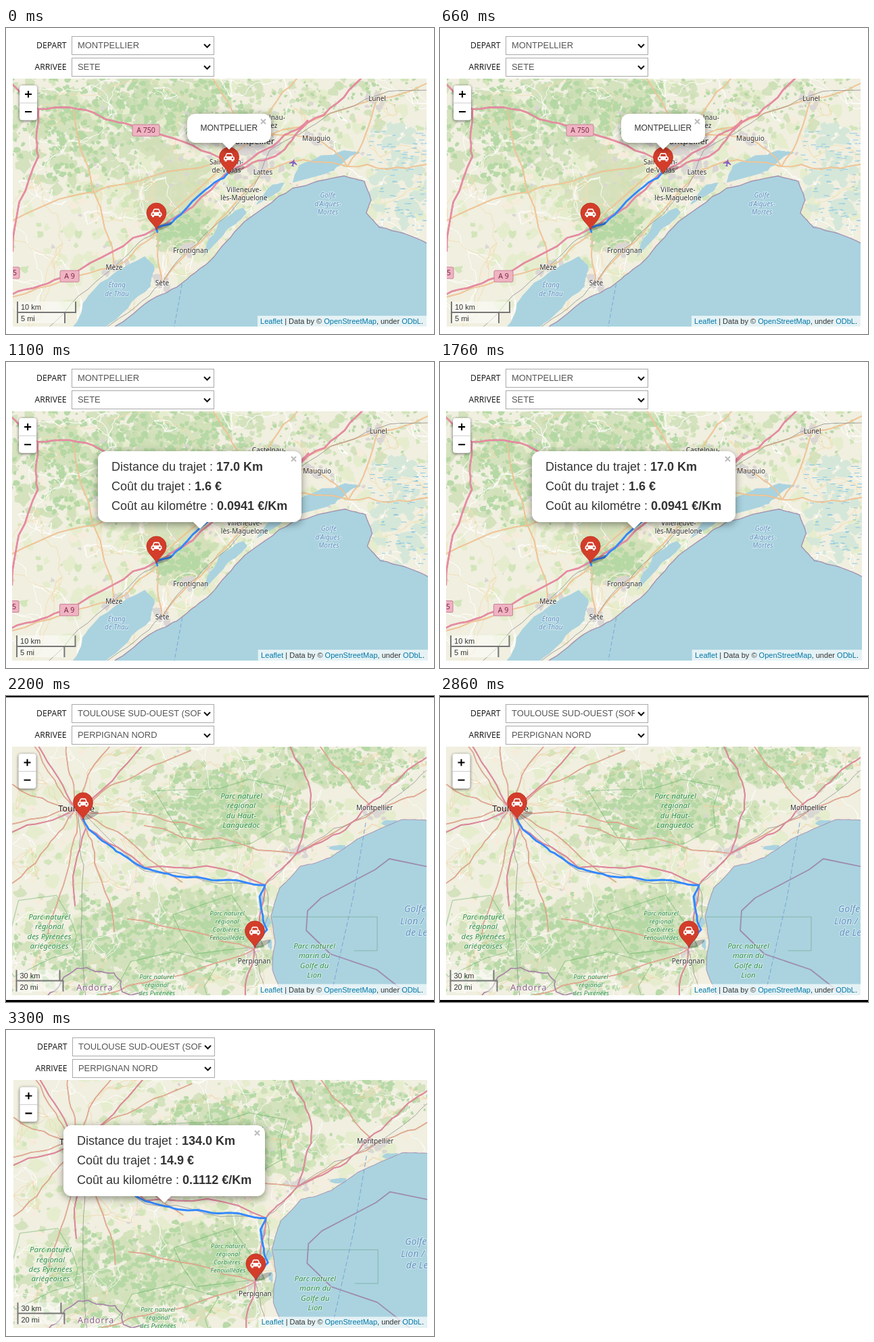
An HTML page that plays this animation: 633 px wide and 453 px high, repeating every 4.4 s.

```html
<!DOCTYPE html>
<html lang="fr">
<head>
<meta charset="utf-8">
<title>Coût du trajet</title>
<style>
html, body { margin: 0; width: 100%; height: 100%; overflow: hidden; background: #fff; }
#stage { display: block; width: 633px; height: 453px; }
.ui { font-family: "Liberation Sans", Arial, sans-serif; }
.form { font: 12.2px "Open Sans", "Noto Sans", sans-serif; fill: #111; }
.map { font: 10px "Noto Sans", "Open Sans", sans-serif; }
.halo { paint-order: stroke; stroke: #fff; stroke-opacity: .5; stroke-width: 2px; stroke-linejoin: round; }
.line { fill: none; stroke-linejoin: round; stroke-linecap: round; }
.popup { filter: drop-shadow(0 3px 6px rgba(0,0,0,.42)); }
.zoom { filter: drop-shadow(0 1px 2px rgba(0,0,0,.6)); }
</style>
</head>
<body>
<svg id="stage" viewBox="0 0 633 453"></svg>
<script>
let seed = 7;
const rnd = () => (seed = (seed * 16807) % 2147483647) / 2147483647;
const spread = () => rnd() + rnd() - 1;
const times = (n, fn) => Array.from({ length: n }, (_, i) => fn(i));

const towns = {
  Lunel: [549, 104], Mauguio: [459, 163], Lattes: [380, 213], Montpellier: [362, 167],
  Frontignan: [273, 329], Sète: [231, 377], Mèze: [160, 354],
  Toulouse: [104, 167], Perpignan: [367, 375], Narbonne: [383, 280], Béziers: [430, 233], Hérault: [545, 170]
};
// Points are "x,y" pairs or town names.
const parse = s => s.split(' ').map(p => towns[p] || p.split(',').map(Number));

// Midpoint displacement, relative to the length of each segment.
function rough(pts, k = .1, depth = 3) {
  if (!depth) return pts;
  const out = [pts[0]];
  for (let i = 1; i < pts.length; i++) {
    const [[ax, ay], [bx, by]] = [pts[i - 1], pts[i]], t = spread() * k;
    out.push([(ax + bx) / 2 + (by - ay) * t, (ay + by) / 2 - (bx - ax) * t], pts[i]);
  }
  return rough(out, k, depth - 1);
}
const path = (pts, end = '') => 'M' + pts.map(p => p.map(v => v.toFixed(1)).join(',')).join('L') + end;
const trace = (s, k, end) => path(rough(parse(s), k), end);
const stroke = (d, color, w, extra = '') =>
  `<path class="line" d="${d}" stroke="${color}" stroke-width="${w}" ${extra}/>`;
const fill = (d, color, extra = '') => `<path d="${d}" fill="${color}" ${extra}/>`;

function roads(list, color, w, casing) {
  const d = list.map(s => trace(s)).join('');
  return (casing ? stroke(d, casing, w + .8) : '') + stroke(d, color, w);
}
const blob = (x, y, rx, ry = rx) => path(times(9, i => {
  const a = i * Math.PI / 4.5, k = .5 + rnd() * .7;
  return [x + Math.cos(a) * rx * k, y + Math.sin(a) * ry * k];
}), 'Z');
const scatter = (color, n, size, x, y, w, h, opacity = 1) => fill(times(n, () => {
  const r = size * (.35 + rnd());
  return blob(x + spread() * w, y + spread() * h, r * (.8 + rnd() * .6), r);
}).join(''), color, `opacity="${opacity}"`);
const wood = (n, size, ...area) =>
  scatter('#cddfb6', n, size * 1.5, ...area, .8) + scatter('#b3d7a2', n * 1.6 | 0, size * .7, ...area, .9);
const fields = () => '<rect width="633" height="453" fill="#f0efe0"/>' +
  scatter('#e6edce', 300, 11, 316, 240, 330, 200) + scatter('#f6ecdc', 140, 6, 316, 240, 330, 200) +
  scatter('#d3e5ba', 300, 5, 316, 240, 330, 200);
const settle = names => names.map(t => scatter('#dad6d4', 14, 5, ...towns[t], 18, 13)).join('');

// Each node is joined to its two nearest neighbours.
function network(n, color, w, opacity) {
  const nodes = times(n, () => [rnd() * 633, 70 + rnd() * 383]);
  const d = nodes.map(a => nodes.filter(b => b !== a)
    .sort((b, c) => Math.hypot(b[0] - a[0], b[1] - a[1]) - Math.hypot(c[0] - a[0], c[1] - a[1]))
    .slice(0, 2).map(b => path(rough([a, b], .25))).join('')).join('');
  return stroke(d, color, w, `opacity="${opacity}"`);
}
const marsh = (n, x, y, w, h) => stroke(times(n, () =>
  `M${x + rnd() * w | 0},${y + rnd() * h | 0}h${3 + rnd() * 5 | 0}`).join(''), '#86c6e4', 1);

const label = (rows, x, y, color = '#333', size = 10, step = 12, extra = '') =>
  rows.split('|').map((t, i) => `<text class="halo" x="${x}" y="${y + i * step}" fill="${color}" font-size="${size}" text-anchor="middle" ${extra}>${t}</text>`).join('');
const italic = (rows, x, y, color, size) => label(rows, x, y, color, size, size * 1.25, 'font-style="italic"');
const town = name => label(name, towns[name][0], towns[name][1] + 4);
const shield = (text, x, y, w) =>
  `<rect x="${x}" y="${y}" width="${w}" height="17" rx="2" fill="#efb3c2" stroke="#c98299"/>` +
  `<text x="${x + w / 2}" y="${y + 12.3}" font-size="10.5" fill="#7c2846" text-anchor="middle">${text}</text>`;

const sea = '#aad3df', border = '#9d7fa6', park = '#2f9048', water = '#5f92c2';

function coastMap() {
  const shore = trace('156,446 222,398 252,384 296,350 344,296 424,237 500,219 530,227 540,255 533,274 552,295 625,320', .06);
  const lagoons = ['96,446 122,396 205,338 219,352 214,382 144,446',
    '424,229 434,203 500,181 524,184 496,202 472,216',
    '290,340 318,284 350,266 356,274 322,306', '370,262 394,232 412,229 404,242'];
  const ponds = lagoons.map(s => trace(s, .12, 'Z')).join('');
  return fields() +
    wood(190, 6, 110, 140, 150, 110) + wood(130, 6, 270, 115, 130, 65) +
    scatter('#d2dfb8', 90, 13, 245, 240, 65, 70, .8) + wood(70, 6, 262, 300, 50, 30) + wood(50, 4, 480, 110, 150, 50) +
    scatter('#dad6d4', 100, 5, 355, 178, 60, 45) + settle(['Lunel', 'Mauguio', 'Frontignan', 'Sète', 'Mèze', 'Lattes']) +
    scatter('#dad6d4', 90, 3, 316, 220, 300, 150) +
    network(150, '#fff', 1, .9) + network(70, '#f3dcae', 1, .8) +
    scatter('#d5e7d9', 70, 9, 580, 220, 48, 95) +
    fill(ponds, sea) + fill(shore + 'L633,453L156,453Z', sea) +
    marsh(45, 530, 150, 90, 70) + marsh(45, 550, 225, 75, 75) +
    stroke(shore, border, 1.4, 'opacity=".8"') +
    stroke('M248,446Q254,415 261,376', '#7aa5d4', 1, 'stroke-dasharray="5 4"') +
    roads(['Sète 222,297 Montpellier', 'Sète Frontignan Lattes', 'Mèze 222,302', 'Montpellier Mauguio 505,205 622,202', 'Montpellier Lunel 622,82', 'Montpellier 306,75', 'Montpellier 430,75', '10,285 150,235 328,190', '10,398 Mèze', '100,122 Mèze', 'Lattes 440,195 505,205 Lunel'], '#f7cb9f', 1.1, '#e3b684') +
    roads(['622,92 480,126 390,181 300,300 Sète 145,446', '222,302 Mèze 60,446'], '#9b9895', .9) +
    roads(['10,84 48,120 48,190 10,330', '48,120 140,131 206,151 316,192', '8,395 94,367 222,297 276,265 331,211 398,190 446,140 526,74', '331,211 412,158 446,137'], '#ea90a6', 1.7, '#d9698a') +
    shield('A 750', 187, 143, 40) + shield('A 9', 80, 359, 28) + shield('75', 0, 354, 20) +
    ['Lunel', 'Mauguio', 'Lattes', 'Frontignan', 'Sète', 'Mèze'].map(town).join('') +
    label('Castelnau-|le-Lez', 388, 136) + label('Montpellier', 362, 172, '#222', 13) +
    label('Saint-Jean-|de-Védas', 326, 202) + label('Villeneuve-|lès-Maguelone', 352, 243) +
    italic('Étang|de Thau', 164, 384, water, 10) + italic("Golfe|d'Aigues-|Mortes", 476, 251, water, 10) +
    fill('M0,-7L1.4,-2L7,2V3.5L1.4,1.8L1,5L3,7H-3L-1,5L-1.4,1.8L-7,3.5V2L-1.4,-2Z', '#8461c4', 'transform="translate(425,199) rotate(12) scale(.85)"');
}

function regionMap() {
  const shore = trace('625,184 585,183 519,212 480,239 435,252 405,284 392,325 398,365 394,405 408,446', .05);
  const ponds = blob(378, 302, 5, 12) + blob(387, 336, 5, 10) + blob(391, 368, 4, 10) + blob(492, 224, 14, 5) + blob(568, 187, 13, 5);
  const parks = blob(345, 165, 115, 62) + blob(60, 355, 85, 62) + blob(320, 340, 70, 42) + blob(230, 430, 95, 45);
  const spokes = times(11, i => {
    const a = i * .571 + spread() * .15, [x, y] = towns.Toulouse;
    return `Toulouse ${x + Math.cos(a) * 70},${y + Math.sin(a) * 70} ${x + Math.cos(a + .1) * 190},${y + Math.sin(a + .1) * 190}`;
  });
  return fields() +
    wood(260, 6, 335, 160, 150, 72) + wood(300, 6, 190, 370, 220, 85) +
    wood(110, 6, 310, 335, 80, 60) + wood(110, 5, 500, 100, 140, 45) +
    scatter('#f4efdf', 70, 6, 425, 235, 75, 30, .9) + settle(['Toulouse', 'Toulouse', 'Hérault', 'Perpignan', 'Béziers']) +
    scatter('#dad6d4', 80, 2.2, 270, 240, 270, 180) +
    network(170, '#fff', .9, .85) + network(90, '#f0d3a4', .9, .75) +
    stroke(parks, '#5eaa5c', 1.3, 'opacity=".45"') +
    fill(shore + 'L633,453Z', sea) + fill(ponds, sea) +
    stroke(shore, border, 1.1, 'opacity=".7"') +
    stroke('M394,327H549V377H515', '#78aa98', 1, 'opacity=".75"') +
    stroke(path(parse('625,253 567,241 546,257 466,299 446,318 444,347 480,382 548,405 600,446')), border, 1.8, 'opacity=".85"') +
    stroke('M532,188L513,300L480,446', '#7aa5d4', 1, 'stroke-dasharray="6 4"') +
    roads([...spokes, 'Béziers 205,192', 'Perpignan 250,415 140,442', 'Perpignan 180,330', 'Hérault 465,75', 'Béziers Hérault 622,138'], '#e8b49a', .9, '#d5967f') +
    roads(['Toulouse 205,259 Narbonne Béziers Hérault 622,110', 'Narbonne 388,326 Perpignan 394,446', 'Toulouse 115,250 118,446'], '#949496', .8) +
    roads(['Toulouse 48,74', 'Toulouse 201,74', 'Toulouse 8,202', 'Toulouse 122,197 205,254 Narbonne', '118,196 102,310', 'Narbonne Béziers 502,198 570,132 622,91', 'Narbonne Perpignan 354,446', 'Béziers 451,146 420,74'], '#e491a3', 1.2, '#cd6f87') +
    stroke(trace('60,446 105,403 160,410 172,438 270,446', .2), '#a883a8', 1.7) +
    label('Toulouse', 104, 171, '#222', 12.7) + label('Montpellier', 545, 169) + label('Perpignan', 367, 396) +
    italic('Parc naturel|régional|du Haut-|Languedoc', 348, 152, park, 11.4) +
    italic('Parc naturel|régional|des Pyrénées|ariégeoises', 64, 331, park, 11.4) +
    italic('Parc naturel|régional|Corbières-|Fenouillèdes', 327, 325, park, 9.5) +
    italic('Parc naturel|marin du|Golfe du|Lion', 456, 374, park, 11.4) +
    italic('Parc naturel|régional|des Pyrénées', 223, 419, park, 9.5) +
    label('Andorra', 131, 436, '#8d618b', 12.8, 0, 'letter-spacing=".7"') +
    italic('Golfe du|Lion / Golf|de León', 615, 320, water, 14);
}

const route = s => stroke(trace(s, .06), '#3388ff', 2.9);
const pin = (x, y) => `<g transform="translate(${x},${y})">
  <ellipse cx="11" cy="19" rx="13" ry="4" fill="#000" opacity=".24" transform="rotate(-24 11 19)"/>
  <path d="M0,24.5C-3,16 -14.5,11 -14.5,-.5A14.5,14.5 0 0 1 14.5,-.5C14.5,11 3,16 0,24.5Z" fill="#d33d2a" stroke="#b5301f" stroke-width=".7"/>
  <path fill="#fff" d="M-8,1.5Q-8,-1 -6,-1.3L-4.4,-5.2Q-4,-6.5 -2.5,-6.5H2.5Q4,-6.5 4.4,-5.2L6,-1.3Q8,-1 8,1.5V4H6.5V6H3.5V4H-3.5V6H-6.5V4H-8Z"/>
  <path fill="#d33d2a" d="M-4.2,-1.5L-3,-4.7H3L4.2,-1.5Z"/>
  <circle cx="-5" cy="1.5" r="1.3" fill="#d33d2a"/><circle cx="5" cy="1.5" r="1.3" fill="#d33d2a"/></g>`;

function controls(x, y, km, kmW, mi, miW) {
  const link = t => `<tspan fill="#0078a8">${t}</tspan>`;
  const sx = x + 6, sy = y + 346, right = 622;
  return `<g class="ui"><rect class="zoom" x="${x + 10}" y="${y + 10}" width="26" height="51.5" rx="4" fill="#fff"/>
  <path d="M${x + 10},${y + 36}h26" stroke="#ccc"/>
  <path d="M${x + 18},${y + 23}h10m-5,-5v10M${x + 18},${y + 49}h10" stroke="#000" stroke-width="2.1"/>
  <rect x="${sx}" y="${sy - 16}" width="${kmW}" height="16" fill="#fff" opacity=".5"/>
  <rect x="${sx}" y="${sy}" width="${miW}" height="16" fill="#fff" opacity=".5"/>
  <path d="M${sx + 1},${sy - 16}V${sy + 16}M${sx},${sy}H${sx + Math.max(kmW, miW)}M${sx + kmW - 1},${sy - 16}v16M${sx + miW - 1},${sy}v16" fill="none" stroke="#777" stroke-width="2"/>
  <g font-size="11" fill="#333"><text x="${sx + 6}" y="${sy - 4}">${km}</text><text x="${sx + 6}" y="${sy + 13}">${mi}</text>
  <rect x="${right - 250}" y="${y + 351}" width="252" height="18" fill="#fff" opacity=".7"/>
  <text x="${right - 5}" y="${y + 363}" text-anchor="end">${link('Leaflet')} | Data by © ${link('OpenStreetMap')}, under ${link('ODbL')}.</text></g></g>`;
}

const popup = (x, y, w, h, tip, body) => `<g class="ui">
  <g class="popup" fill="#fff"><rect x="${x}" y="${y}" width="${w}" height="${h}" rx="12"/>
  <path d="M${tip - 11},${y + h - 1}h22L${tip},${y + h + 10}Z"/></g>
  <path d="M${x + w - 15},${y + 8}l7,7m0,-7l-7,7" stroke="#bdbdbd" stroke-width="2"/>
  <g fill="#333">${body}</g></g>`;
const cost = (x, y, ...values) => ['Distance du trajet', 'Coût du trajet', 'Coût au kilométre'].map((k, i) =>
  `<text x="${x}" y="${y + i * 29}" font-size="18">${k} : <tspan font-weight="bold">${values[i]}</tspan></text>`).join('');

const field = (name, value, x, y) => `<text class="form" x="${x - 7.5}" y="${y + 18}" text-anchor="end">${name}</text>
  <rect x="${x + .5}" y="${y + .5}" width="210" height="27" fill="#fff" stroke="#a9a9a9"/>
  <svg x="${x + 9}" y="${y}" width="182" height="28"><text class="ui" y="17.6" font-size="12.9" fill="#555">${value}</text></svg>
  <path d="M${x + 196},${y + 12}l4.5,4.5l4.5,-4.5" fill="none" stroke="#111" stroke-width="2"/>`;
const form = (x, y, from, to) => field('DEPART', from, x, y) + field('ARRIVEE', to, x, y + 32);
const view = (x, y, w, h, box, body) =>
  `<svg class="map" x="${x}" y="${y}" width="${w}" height="${h}" viewBox="${box}" preserveAspectRatio="none">${body}</svg>`;

const boxA = '10 75 612 367', boxB = '9 75 613 368';
const mapA = coastMap() + route('331,212 322,222 308,229 272,261 243,290 222,296 224,302') + pin(222.5, 274);
const mapB = regionMap() + route('114,182 122,197 163,230 205,255 252,267 312,273 350,275 366,279 383,280 375,297 381,335 386,346 368,370') + pin(368, 348);
const uiA = controls(10, 75, '10 km', 88, '5 mi', 72);
const uiB = controls(8.5, 75.5, '30 km', 66, '20 mi', 71);
const tripA = ['MONTPELLIER', 'SETE'], tripB = ['TOULOUSE SUD-OUEST (SORTIE)', 'PERPIGNAN NORD'];

const scenes = [
  form(97, 12, ...tripA) + view(10, 75, 612, 367, boxA, mapA + pin(330, 191.5) + uiA) +
    popup(268, 127, 124, 43, 330, '<text x="287.5" y="152" font-size="12">MONTPELLIER</text>'),
  form(97, 10, ...tripA) + view(9, 73, 615, 369, boxA, mapA + uiA) +
    popup(136, 132, 301, 105, 287, cost(156, 161, '17.0 Km', '1.6 €', '0.0941 €/Km')),
  form(97, 12, ...tripB) + view(9, 75, 613, 368, boxB, mapB + pin(114, 158) + uiB) +
    '<path d="M0,0H633V2H0ZM0,450H633V453H0Z"/>',
  form(98, 11, ...tripB) + view(11, 74, 612, 367, boxB, mapB + uiB) +
    popup(85, 141, 298, 105, 234, cost(105, 170, '134.0 Km', '14.9 €', '0.1112 €/Km'))
];

const stage = document.getElementById('stage');
stage.innerHTML = scenes.map(s => `<g display="none">${s}</g>`).join('');
const groups = [...stage.children], hold = 1100;
const start = performance.now();
let shown = -1;
function tick() {
  const i = Math.floor((performance.now() - start) / hold) % groups.length;
  if (i !== shown) {
    groups.forEach((g, k) => g.setAttribute('display', k === i ? 'inline' : 'none'));
    shown = i;
  }
  requestAnimationFrame(tick);
}
tick();
</script>
</body>
</html>
```
